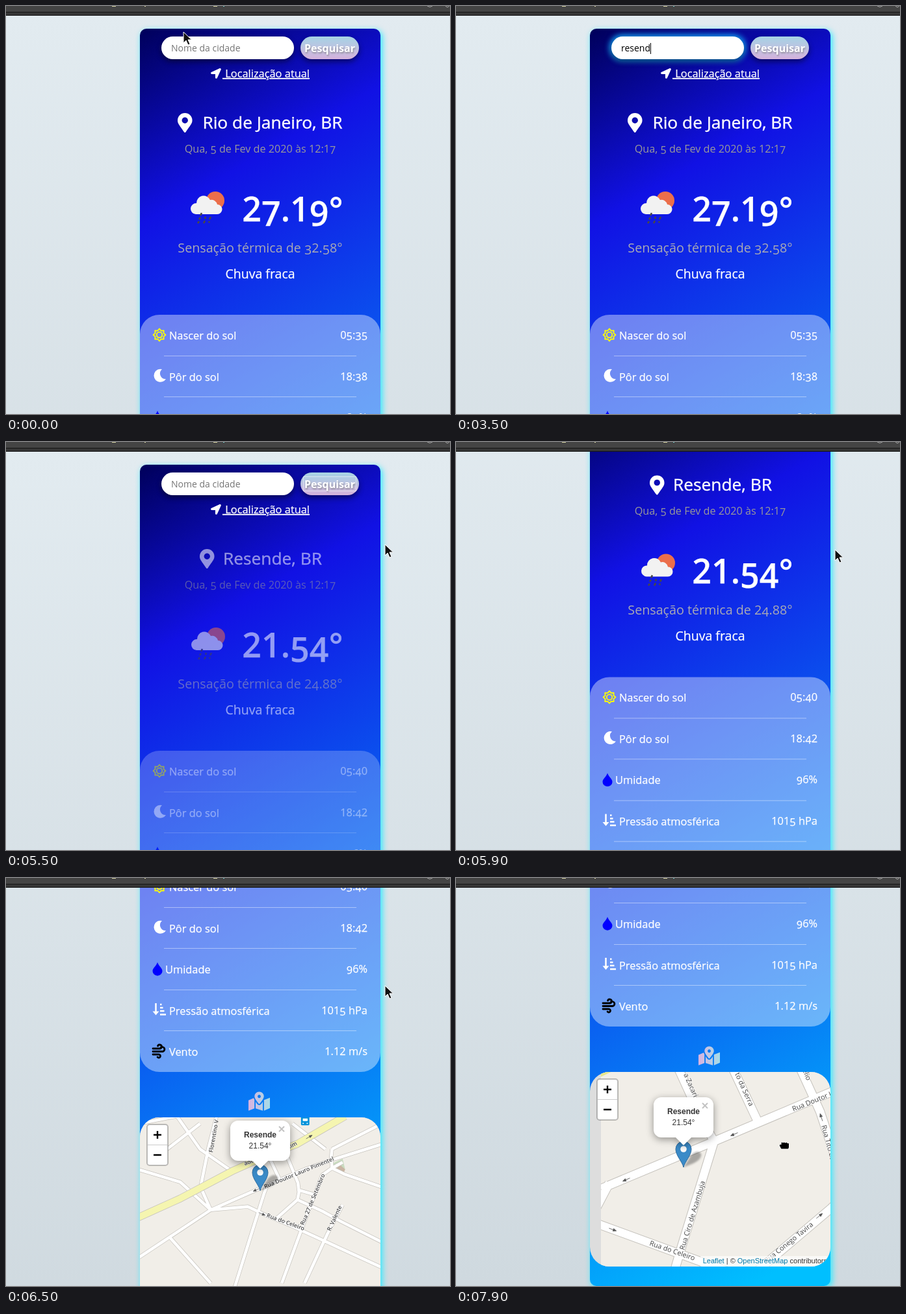
Recreate the animation shown at these times as an HTML page. Size 683x629 px, loop 8000 ms.

```html
<!DOCTYPE html>
<html lang="pt-BR">
<head>
<meta charset="utf-8">
<title>Clima</title>
<style>
html, body { margin: 0; width: 100%; height: 100%; overflow: hidden; background: #d9e2e8; }
svg { display: block; }
text { font-family: "Open Sans", "Noto Sans", sans-serif; white-space: pre; }
.card text { fill: #fff; font-size: 16.4px; stroke: #fff; stroke-width: .25px; }
.card .gray { fill: #a9a9b4; stroke: none; }
.mid { text-anchor: middle; }
.end { text-anchor: end; }
.low { baseline-shift: -.14em; }
.card .field { font-size: 14px; stroke: none; }
.shade { filter: drop-shadow(0 4px 4px #0007); }
.road { fill: none; stroke: #fff; stroke-width: 12; stroke-linejoin: round; }
.edge { fill: none; stroke: #c4c1bb; stroke-width: 15.5; stroke-linejoin: round; }
.name { fill: #444; stroke: #fff; paint-order: stroke; }
#farNames { font-weight: 600; }
.ui text { font-family: "Liberation Sans", Arial, sans-serif; font-size: 12px; fill: #333; }
.ui .credit { font-size: 11px; }
.link { fill: #0078a8; }
</style>
</head>
<body>
<svg width="683" height="629" viewBox="0 0 683 629">
<defs>
  <linearGradient id="sky" x1="0" y1="0" x2="0" y2="1"><stop stop-color="#e2ebf0"/><stop offset="1" stop-color="#cfd9df"/></linearGradient>
  <linearGradient id="blue" gradientUnits="userSpaceOnUse" x1="206" y1="35" x2="800" y2="1064">
    <stop stop-color="#00005a"/><stop offset=".22" stop-color="#1111e4"/><stop offset=".95" stop-color="#00bfff"/>
  </linearGradient>
  <linearGradient id="btnUp" x1="0" y1="0" x2="0" y2="1"><stop stop-color="#a5d3e5"/><stop offset="1" stop-color="#d5b2dc"/></linearGradient>
  <linearGradient id="btnDown" x1="0" y1="0" x2="0" y2="1"><stop stop-color="#d5b2dc"/><stop offset="1" stop-color="#a5d3e5"/></linearGradient>
  <linearGradient id="btnSide"><stop stop-color="#d9b3e0"/><stop offset="1" stop-color="#a5dce8"/></linearGradient>
  <clipPath id="mapBox"><rect x="206" y="299" width="370" height="300" rx="30"/></clipPath>
  <path id="farRoads" d="M60 510L206 446 330 392 430 350 545 310 736 250M262 210L289 299 333 393M283 412L270 446 223 596 150 830
    M345 270L361 299 404 403 408 440 402 470 320 543M402 470L500 515 576 557 740 640M408 432L470 450M538 345L500 372 470 450 415 595 340 800
    M538 270L535 300 538 345 590 370 736 420M538 345L580 322M538 270L736 169M382 169L512 270M-226 350L-60 400 60 510 206 497 284 534 376 572 740 740
    M580 490L520 605 430 800M83 140L50 270 20 420 60 510M-112 270L18 169M-73 140L18 270 150 362M-226 170L-73 140M-226 700L60 510M-100 620L60 800"/>
  <path id="avenue" d="M-226 540L-60 465 150 354 275 298 400 250 590 140"/>
  <path id="nearRoads" d="M223 479L397 406 700 278M236 470L210 520M397 406L345 575 300 730M300 205L345 300 376 368 397 406M380 190L425 292 465 377
    M470 160L528 290 560 360 590 450 640 600M100 490L223 535 400 600 600 670M430 634L576 510 650 440"/>
</defs>

<g id="page">
  <rect y="15" width="683" height="1178" fill="url(#sky)"/>
  <rect x="208" y="38" width="371" height="1158" rx="10" fill="#2feaff" style="filter:blur(5px)"/>
  <rect x="206" y="35" width="370" height="1158" rx="10" fill="url(#blue)"/>
  <g class="card">
    <rect id="glow" x="236" y="44" width="210" height="41" rx="20" fill="#12a8ff" style="filter:blur(4px)"/>
    <rect class="shade" x="239" y="47" width="204" height="35" rx="17.5" fill="#fff"/>
    <text id="query" class="field" x="254" y="70"></text>
    <path id="caret" d="M0 57V74" stroke="#000"/>
    <g id="button">
      <rect id="face" class="shade" x="453" y="47" width="90" height="35" rx="17.5"/>
      <text x="498" y="71" class="mid" style="font-weight:700;font-size:16px;stroke:none;filter:drop-shadow(1px 2px 1px #777a)">Pesquisar</text>
      <rect id="focus" x="457.5" y="53.5" width="81" height="22" fill="none" stroke="#fff" stroke-dasharray="1 1"/>
    </g>
    <path transform="translate(315 96)scale(.031)" fill="#fff" d="M445 4L29 195c-48 22-32 93 19 93h176v176c0 51 70 67 93 19L508 68c16-39-25-80-63-64z"/>
    <text x="467" y="110" class="end" text-decoration="underline"> Localização atual</text>
    <g id="weather">
      <path id="pin" fill="#fff" fill-rule="evenodd" d="M172 502C27 291 0 269 0 192a192 192 0 0 1 384 0c0 77-27 99-172 310q-20 20-40 0zM192 272a80 80 0 1 0-.1 0z"/>
      <text id="city" class="mid" x="410" y="189" style="font-size:26.3px;font-weight:500;stroke-width:.4px"></text>
      <text class="mid old gray" x="391" y="226" style="font-size:16.2px;fill:#999">Qua, 5 de Fev de 2020 às 12:17</text>
      <g id="icon">
        <circle cx="322" cy="300" r="14" fill="#eb6e4b"/>
        <path d="M292 321a8 8 0 0 1 1-17 11 11 0 0 1 21-5 9 9 0 0 1 11 7 7.300 7.300 0 0 1 0 15z" fill="#f2f2f2"/>
        <path d="M301 319l-2 4M299 326l-2 3M297 332l-2 3M307 325l-1 3M306 331l-2 4M315 325l-2 4M313 332l-1 2" stroke="#484848" stroke-width="2.600"/>
      </g>
      <text id="temp" class="mid" x="441" y="332" style="font-size:52px;font-weight:600"></text>
      <text id="feel" class="mid gray" x="391" y="380" style="font-size:19.7px"></text>
      <text class="mid" x="391" y="420" style="font-size:19.5px">Chuva fraca</text>
      <rect x="206" y="476" width="370" height="317" rx="30" fill="#fff" fill-opacity=".4"/>
      <path d="M243 539.500H539M243 602.500H539M243 666.500H539M243 729.500H539" stroke="#fff" stroke-opacity=".42"/>
      <g id="sun" fill="none" stroke="#ff0" stroke-width="1.800" stroke-linejoin="round"><circle cx="236" cy="507" r="4.300"/></g>
      <path d="M240 560a10 10 0 1 0 6 15 8.500 8.500 0 0 1-6-15z" fill="#fff"/>
      <path d="M233 624c2 6 7.500 9 7.500 13.500a7.300 7 0 0 1-15 0C225.500 633 231 630 233 624z" fill="#00f"/>
      <path d="M230.500 687v14M237 689h2.500M237 694h4.500M237 699h6.500M237 704.500h9" fill="none" stroke="#fff" stroke-width="2.500"/>
      <path d="M225.500 699.500h10l-5 6z" fill="#fff"/>
      <path d="M226 757h10a3 3 0 1 0-2.500-4M226 761.500h15a3.500 3.500 0 1 0-3-6M226 766h9a2.500 2.500 0 1 1-2 4" fill="none" stroke="#000" stroke-width="2.800" stroke-linecap="round"/>
      <g id="rows"></g>
    </g>
    <path transform="translate(373 823.500)scale(.0573)" fill="url(#btnSide)" fill-rule="evenodd" d="M288 0a126 126 0 0 0-126 126c0 56 82 159 114 196q12 12 24 0c32-37 114-140 114-196A126 126 0 0 0 288 0zm0 168a42 42 0 1 1 .1 0zM0 232L139 168 160 215V448L0 512zM192 266q45 94 96 94t96-94V512L192 448zM416 224L576 160V440L416 512z"/>
  </g>

  <g transform="translate(0 564)"><g clip-path="url(#mapBox)">
    <rect x="206" y="299" width="370" height="300" fill="#ddd"/>
    <g id="far">
      <g style="filter:blur(.7px)">
        <rect x="-600" y="-300" width="1900" height="1800" fill="#f1eee8"/>
        <path d="M542 325L580 308 590 350 550 350z" fill="#c9dcc0"/><path d="M552 350l18-18 20 18-10 24z" fill="#c9b5a3"/>
        <use href="#farRoads" class="edge"/><use href="#farRoads" class="road"/>
        <use href="#avenue" class="edge" style="stroke-width:30"/><use href="#avenue" class="road" style="stroke:#f5f5b0;stroke-width:26"/>
        <rect x="416" y="140" width="33" height="36" rx="5" fill="#0092da"/>
        <path d="M423 149h19v10h-19zM422 166h5v4h-5zM438 166h5v4h-5z" fill="#fff"/>
        <g id="farNames"></g>
      </g>
    </g>
    <g id="near">
      <svg x="223" y="-300" width="1200" height="1500" viewBox="223 -300 1200 1500">
        <rect x="223" y="-300" width="1200" height="1500" fill="#f1eee8"/>
        <path d="M215 308L240 296" stroke="#e6e68a" stroke-width="4"/>
        <use href="#nearRoads" class="edge" style="stroke-width:14.500"/><use href="#nearRoads" class="road" style="stroke-width:12.500"/>
        <g id="nearNames"></g>
      </svg>
    </g>
    <g id="marker" class="ui">
      <path d="M0 0L12-19q10-9 15-2 2 8-12 15z" fill="#000" opacity=".3" style="filter:blur(1.5px)"/>
      <path d="M0 0C-2-9-12-18-12-28a12 12 0 0 1 24 0C12-18 2-9 0 0z" fill="#3b8bc8" stroke="#2e6c9f"/>
      <circle cy="-28" r="4.800" fill="#fff"/>
      <path d="M-34-108H34a12 12 0 0 1 12 12v38a12 12 0 0 1-12 12H12L0-34-12-46H-34a12 12 0 0 1-12-12v-38a12 12 0 0 1 12-12z" fill="#fff" style="filter:drop-shadow(0 3px 6px #0006)"/>
      <text class="mid" y="-82" font-weight="700">Resende</text>
      <text class="mid" y="-65">21.54°</text>
      <path d="M29-99l8 8M37-99l-8 8" stroke="#c3c3c3" stroke-width="2"/>
    </g>
    <g class="ui">
      <rect x="217" y="310" width="32" height="63" rx="4" fill="#fff" stroke="#000" stroke-opacity=".25" stroke-width="2"/>
      <path d="M218 341.500h30" stroke="#ccc"/>
      <path d="M227 326h12M233 320v12M227 357h12" stroke="#000" stroke-width="2.400"/>
      <rect x="376" y="583" width="200" height="16" fill="#fff" opacity=".7"/>
      <text class="credit end" x="571" y="594"><tspan class="link">Leaflet</tspan> | © <tspan class="link">OpenStreetMap</tspan> contributors</text>
    </g>
  </g></g>
</g>

<rect width="683" height="15" fill="#151515"/>
<rect width="683" height="9" fill="#444"/>
<rect y="10" width="683" height="4" fill="#363636"/>
<path d="M163 .5h6M319 .5h6M213 .5h2" stroke="#ddd9a8"/><path d="M334 .5h2" stroke="#7cc"/><path d="M648 0q4 3 8 0M676 0l3 2 3-2" fill="none" stroke="#aaa"/>
<path id="mouse" stroke-linejoin="round"/>
</svg>

<script>
const $ = id => document.getElementById(id);
const set = (id, attrs) => { for (const k in attrs) $(id).setAttribute(k, attrs[k]); };
const show = (id, on) => { $(id).style.display = on ? "" : "none"; };
// old-style figures: some digits hang below the baseline
const figures = s => s.replace(/[34579]/g, '<tspan class="low">$&</tspan>');
const at = (x, y, deg) => `transform="translate(${x} ${y})rotate(${deg})"`;
const label = size => ([x, y, deg, text]) =>
  `<text class="name" ${at(x, y, deg)} font-size="${size}" stroke-width="${size / 8}">${text}</text>`;
const arrow = k => ([x, y, deg]) =>
  `<path ${at(x, y, deg)} d="M${-6 * k} 0H${2 * k}M${k} ${-2 * k}L${6 * k} 0 ${k} ${2 * k}z" fill="#555" stroke="#555" stroke-width="${k / 1.3}"/>`;

$("farNames").innerHTML = [
  [274, 426, -22.3, "Rua Doutor Lauro Pimentel"], [427, 572, -67.3, "Rua 27 de Setembro"],
  [279, 538, 20, "Rua do Celeiro"], [532, 595, -65, "R. Valente"], [195, 335, -22, "ador T"],
  [68, 284, -80, "Florentino V"], [372, 268, -28, "lim"]
].map(label(22.5)).join("") + [[240, 431, 157], [262, 526, 22], [448, 222, -30]].map(arrow(2.3)).join("");

$("nearNames").innerHTML = [
  [519, 360, -22, "Rua Doutor Lauro Pimentel"], [351, 574, -73, "Rua Ciro de Azambuja"],
  [297, 566, 19, "Rua do Celeiro"], [478, 594, -39, "Rua Conego Tavira"],
  [429, 302, 66, "to da Serra"], [350, 303, 66, "a Zacarias"], [533, 296, 68, "élio"], [562, 382, 75, "Rua Tito Lemos"]
].map(label(10.8)).join("") +
  [[428, 395, 157], [262, 465, 157], [241, 542, 20], [562, 369, -108], [559, 521, -39]].map(arrow(1)).join("");

const rays = Array.from({ length: 16 }, (_, i) => {
  const r = i % 2 ? 7 : 9.5, a = i * Math.PI / 8;
  return [236 + r * Math.cos(a), 507 + r * Math.sin(a)];
});
$("sun").innerHTML += `<polygon points="${rays}"/>`;

$("rows").innerHTML = ["Nascer do sol", "Pôr do sol", "Umidade", "Pressão atmosférica", "Vento"].map((name, i) => {
  const y = 514 + 63.5 * i;
  return `<text x="${i == 2 ? 245 : 251}" y="${y}">${name}</text><text id="v${i}" class="end" x="556" y="${y - 1}"></text>`;
}).join("");
document.querySelectorAll(".old").forEach(e => { e.innerHTML = figures(e.textContent); });

const cities = [
  { city: "Rio de Janeiro, BR", pin: 264, dx: 0, temp: "27.19°", feel: "32.58°", v: ["05:35", "18:38", "89%", "1015 hPa", "1.12 m/s"] },
  { city: "Resende, BR", pin: 298, dx: 1, temp: "21.54°", feel: "24.88°", v: ["05:40", "18:42", "96%", "1015 hPa", "1.12 m/s"] }
];
let current;
function showCity(c) {
  if (c == current) return;
  current = c;
  $("city").textContent = c.city;
  $("temp").innerHTML = figures(c.temp);
  $("feel").innerHTML = "Sensação térmica de " + figures(c.feel);
  c.v.forEach((s, i) => { $("v" + i).innerHTML = figures(s); });
  set("pin", { transform: `translate(${c.pin} 165)scale(.0586)` });
  set("icon", { transform: `translate(${c.dx} 0)` });
}

const clamp = v => Math.min(1, Math.max(0, v));
// keys: [time, ...values], linear in between
function track(keys, t) {
  const n = keys.findIndex(k => k[0] > t);
  if (n < 0) return keys[keys.length - 1].slice(1);
  const a = keys[n - 1], b = keys[n], p = (t - a[0]) / (b[0] - a[0]);
  return a.slice(1).map((v, i) => v + (b[i + 1] - v) * p);
}
const path = [
  [0, 273, 40], [200, 273, 40], [800, 325, 70], [3900, 325, 70], [4400, 475, 72], [4700, 475, 72], [4800, 577, 135],
  [5000, 583, 158], [5700, 583, 158], [5900, 583, 166], [6600, 583, 166], [6900, 478, 400], [7200, 478, 400],
  [7400, 285, 420], [7700, 470, 414], [7800, 470, 414], [7900, 505, 412]
];
const scroll = [[0, 0], [5700, 0], [6200, 284], [6600, 564]];
const typed = [[0, ""], [2200, "re"], [3100, "resen"], [3500, "resend"], [3600, "resende"], [4900, ""]];
const pointers = {
  arrow: ["M0 0V17l4-4 3 7 3-1.300-3-6.700h5.500z", "#111", "#fff"],
  beam: ["M-3-7q3 0 3 2V5q0 2-3 2M3-7q-3 0-3 2M3 7q-3 0-3-2M-2 1h4", "none", "#000"],
  hand: ["M0-1q2-1 2.500 1v5l6 1.500q2 1 1.500 4l-1.500 4.500h-8l-4-6q1.500-2 3.500 0z", "#000", "#fff"],
  grab: ["M-4 7l-4-6q1-2 3 0l-2-6q1.500-2 3 0l1 3-.5-5q1.500-2 3 0l.5 5 1-4.500q2-1.500 2.500.5l-.5 5 1.500-3q2-1 2 1l-2 7-1.500 3z", "#fff", "#000"],
  drag: ["M-5 6l-3-6 2-2 1 1v-3q1.500-2 3 0 1.500-2 3.500 0 2-1.500 3.500.5 2-1 2.500 1.500v5l-1 3z", "#000", "#fff"]
};

function pointerAt(x, y, t) {
  if (t >= 7400) return "drag";
  if (t > 6600) return y > 299 && x < 576 ? "grab" : "arrow";
  if (y < 47 || y > 82 || x > 543) return "arrow";
  return x < 443 ? "beam" : x > 453 ? "hand" : "arrow";
}

function draw(now) {
  const t = Math.floor(now % 8000 / 100) * 100;   // the picture steps ten times a second
  const [x, y] = track(path, t);
  const kind = pointerAt(x, y, t), [d, fill, stroke] = pointers[kind];
  set("mouse", { d, fill, stroke, transform: `translate(${x} ${y})` });
  show("mouse", t < 2200 || t >= 4000);

  const text = typed.filter(k => k[0] <= t).pop()[1], query = $("query");
  query.textContent = text || "Nome da cidade";
  query.style.fill = text ? "#000" : "#757575";
  const end = 254.5 + (text ? query.getComputedTextLength() : 0);
  set("caret", { transform: `translate(${Math.floor(end) + .5} 0)` });
  show("caret", t >= 700 && t < 2000 || t >= 2200 && t < 3300 || t >= 3500 && t < 4500);
  $("glow").style.opacity = clamp((t - 500) / 300) * clamp((4700 - t) / 300);

  const hover = kind == "hand";
  set("face", { fill: hover ? "url(#btnDown)" : "url(#btnUp)" });
  set("button", { transform: `translate(0 ${hover && t >= 4500 ? 1 : 0})` });
  show("focus", t >= 4500);

  showCity(cities[t < 5000 ? 0 : 1]);
  $("weather").style.opacity = t < 5000 ? 1 : clamp((t - 5000) / 900);
  set("page", { transform: `translate(0 ${-track(scroll, t)[0]})` });

  // wheel zoom around a fixed point, then a drag
  const zoom = 4 ** clamp((t - 6850) / 368), drag = t >= 7400;
  const mx = 478 - 87 * zoom + (drag ? x - 285 : 0);
  const my = 398 + 14 * zoom + (drag ? y - 420 : 0);
  set("marker", { transform: `translate(${mx} ${my})` });
  set("far", { transform: `translate(${mx} ${my})scale(${zoom / 2.563})translate(-255 -434)` });
  set("near", { transform: `translate(${mx} ${my})scale(${zoom / 4})translate(-350 -446)` });
  show("far", t < 7300);
  show("near", t >= 7300);
  requestAnimationFrame(() => draw(performance.now() - start));
}
const start = performance.now();
draw(0);
</script>
</body>
</html>
```
